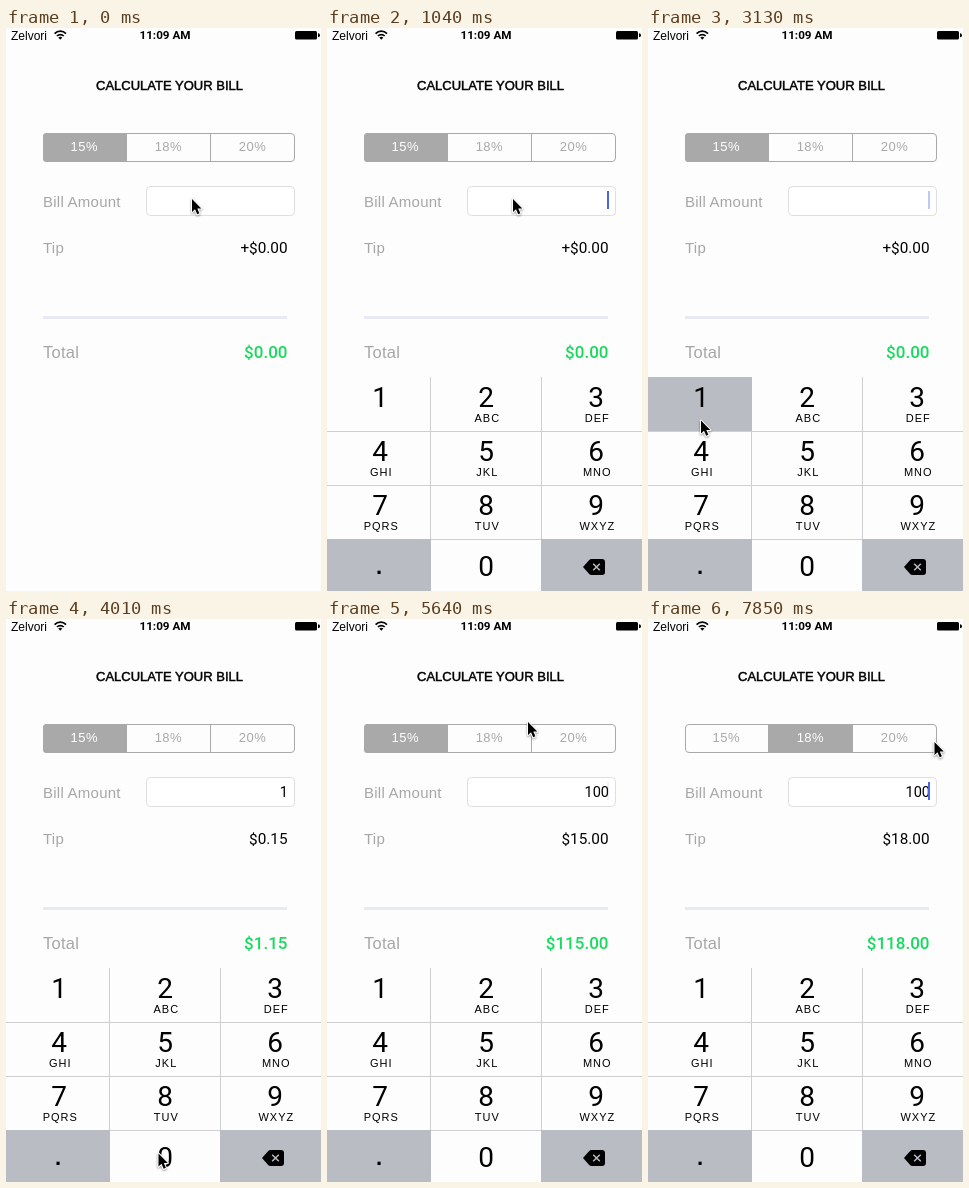
These frames come from a looping animation (315x563 px, 8000 ms). An HTML page:

```html
<!DOCTYPE html>
<html lang="en">
<head>
<meta charset="utf-8">
<title>Tip calculator</title>
<style>
  html, body { margin: 0; height: 100%; overflow: hidden; background: #fdfdfd; }
  svg { display: block; width: 100vw; height: 100vh; }
  text { font-family: "Liberation Sans", Arial, sans-serif; }
  .num { font-family: Roboto, "Liberation Sans", sans-serif; }
  .mid { text-anchor: middle; }
  .end { text-anchor: end; }
  .label { font-size: 15px; letter-spacing: .25px; fill: #a6a6a6; }
  .title { font-size: 13px; stroke: #000; stroke-width: .45px; }
  .money { font-size: 15.3px; }
  .total { font-size: 17px; font-weight: 500; fill: #19d95f; }
  .seg { font-size: 13px; letter-spacing: .5px; }
  .digit { font-size: 28px; }
  .sub { font-size: 11px; letter-spacing: 1px; }
  .grid { fill: none; stroke: #cfcfd2; }
  .edge { fill: none; stroke: #a9a9a9; }
  #mouse { filter: drop-shadow(0 1px 1px rgba(0, 0, 0, .4)); }
</style>
</head>
<body>
<svg viewBox="0 0 315 563">
  <rect width="315" height="563" fill="#fdfdfd"/>

  <g id="status">
    <text x="5" y="11.5" font-size="12">Zelvori</text>
    <g fill="none" stroke="#000" stroke-width="1.7">
      <path d="M48.6 5.6a8 8 0 0 1 11.4 0"/>
      <path d="M50.9 8a4.8 4.8 0 0 1 6.8 0"/>
    </g>
    <path d="M54.3 11.8l-2-2.2a2.9 2.9 0 0 1 4 0z"/>
    <text class="num mid" x="159" y="11.3" font-size="11.7" font-weight="700">11:09 AM</text>
    <rect x="289" y="3" width="22" height="8.5" rx="1.5"/>
    <path d="M312 5.3a2 2 0 0 1 0 4z"/>
  </g>

  <text class="mid title" x="163.5" y="61.6">CALCULATE YOUR BILL</text>

  <g id="segs"></g>
  <path class="edge" d="M120.5 105.5v28M204.5 105.5v28"/>
  <rect class="edge" x="37.5" y="105.5" width="251" height="28" rx="3.5"/>

  <text class="label" x="37" y="178.5">Bill Amount</text>
  <rect x="140.5" y="158.5" width="148" height="29" rx="4" fill="#fff" stroke="#dedede"/>
  <text class="num end" id="bill" x="282" y="178" font-size="14.5"></text>
  <rect id="caret" x="280" y="163" width="2" height="18" fill="#4668e6"/>

  <text class="label" x="37" y="224.6">Tip</text>
  <text class="num end money" id="tip" x="281.5" y="225"></text>
  <rect x="37" y="288" width="244" height="3" fill="#e7e9f3"/>
  <text class="label" x="37" y="330" style="font-size:16.5px">Total</text>
  <text class="num end total" id="total" x="281.5" y="330"></text>

  <g id="pad">
    <rect width="315" height="214" fill="#fdfdfd"/>
    <path class="grid" d="M103.5 0v162M214.5 0v162M0 54.5h315M0 108.5h315M0 162.5h315"/>
    <path fill="#b9bcc2" d="M0 162h104v52H0zM214 162h101v52H214z"/>
    <g id="keys"></g>
    <text class="mid" x="52" y="196.5" font-size="22" font-weight="bold">.</text>
    <path d="M256 190l6.2-7q.9-1 2.2-1h10.6q3 0 3 3v10q0 3-3 3h-10.6q-1.3 0-2.2-1z"/>
    <path d="M266.2 186.7l6.6 6.6m0-6.6l-6.6 6.6" stroke="#b9bcc2" stroke-width="1.5"/>
  </g>

  <g id="mouse">
    <path d="M1 1.5v13l3-2.7 2.2 5 2.2-1-2.1-4.9h4z" stroke="#fff" stroke-width="2" stroke-linejoin="round" paint-order="stroke"/>
  </g>
</svg>

<script>
const LOOP = 8000, START = 450, TICK = 148;
const GREY = '#a9a9a9', PRESSED = '#b9bcc2';
const $ = id => document.getElementById(id);
const clamp = v => Math.min(1, Math.max(0, v));

function add(parent, tag, attrs, text = '') {
  const el = document.createElementNS('http://www.w3.org/2000/svg', tag);
  for (const k in attrs) el.setAttribute(k, attrs[k]);
  el.textContent = text;
  return parent.appendChild(el);
}

// Percentage segments
const segs = [15, 18, 20].map((rate, i) => ({
  rate,
  box: add($('segs'), 'rect', { x: 37 + 83.7 * i, y: 105, width: 83.7, height: 29, rx: i === 1 ? 0 : 3.5 }),
  text: add($('segs'), 'text', { class: 'mid seg', x: 78.3 + 84.1 * i, y: 123 }, rate + '%')
}));

// Number keys
const columns = [{ x: 0, mid: 53 }, { x: 104, mid: 159 }, { x: 214, mid: 269 }];
const keys = {};
function addKey(name, col, row, sub = '') {
  const { x, mid } = columns[col], y = 54 * row;
  keys[name] = add($('keys'), 'rect', { x, y, width: col ? 110 : 104, height: 54, fill: PRESSED });
  add($('keys'), 'text', { class: 'num mid digit', x: mid, y: y + (sub || row < 3 ? 30 : 37) }, name);
  add($('keys'), 'text', { class: 'mid sub', x: mid + 1.3, y: y + 45.2 }, sub);
}
' ABC DEF GHI JKL MNO PQRS TUV WXYZ'.split(' ')
  .forEach((sub, i) => addKey(String(i + 1), i % 3, Math.floor(i / 3), sub));
addKey('0', 1, 3);

const FOCUS = 1, PICK = 42;
const taps = [{ at: 18, key: '1' }, { at: 25, key: '0' }, { at: 28, key: '0' }];
const home = [185, 169.5];
const moves = [
  { at: 10, ticks: 1, to: [-20, 54] },
  { at: 12, ticks: 5, to: [52, 391] },
  { at: 19, ticks: 4, to: [151.5, 533] },
  { at: 31, ticks: 4, to: [200, 101.5] },
  { at: 37, ticks: 3, to: [180, 109] },
  { at: 48, ticks: 2, to: [285.5, 121.5] }
];

function mouseAt(n) {
  return moves.reduce((pos, { at, ticks, to }) => {
    const u = clamp((n - at) / ticks), e = u * u * (3 - 2 * u);
    return pos.map((v, i) => v + (to[i] - v) * e);
  }, home);
}

// Blinks every seven ticks, starting over at each typed digit
function caretAt(n, typed) {
  if (n < FOCUS) return 0;
  const since = typed.length ? typed[typed.length - 1].at + 1 : FOCUS;
  const p = (n - since + 1) % 7;
  return clamp(Math.min(p + .1, 4.35 - p));
}

// Critically damped slide of the number pad
function padTop(n) {
  if (n < 0) return 563;
  const s = (n * TICK + 25) * .01826;
  return 349 + Math.round(214 * Math.exp(-s) * (1 + s));
}

const money = v => '$' + v.toFixed(2);

function draw(t) {
  const n = Math.floor((t - START) / TICK);
  const typed = taps.filter(tap => tap.at < n);
  const digits = typed.map(tap => tap.key).join('');
  const bill = Number(digits);
  const rate = n > PICK ? 18 : 15;
  const tip = bill * rate / 100;

  $('bill').textContent = digits;
  $('tip').textContent = (bill ? '' : '+') + money(tip);
  $('total').textContent = money(bill + tip);
  $('caret').setAttribute('opacity', caretAt(n, typed));
  $('mouse').setAttribute('transform', `translate(${mouseAt(n)})`);
  $('pad').setAttribute('transform', `translate(0 ${padTop(n)})`);

  for (const s of segs) {
    const on = s.rate === rate;
    const touched = s.rate === 18 && n === PICK;
    s.box.setAttribute('fill', on ? GREY : touched ? '#e9e9e9' : 'none');
    s.text.style.fill = on ? '#fff' : GREY;
  }
  for (const name in keys) {
    const down = taps.some(tap => tap.at === n && tap.key === name);
    keys[name].setAttribute('visibility', down ? 'visible' : 'hidden');
  }
}

const origin = performance.now();
function loop() {
  draw((performance.now() - origin) % LOOP);
  requestAnimationFrame(loop);
}
loop();
</script>
</body>
</html>
```
